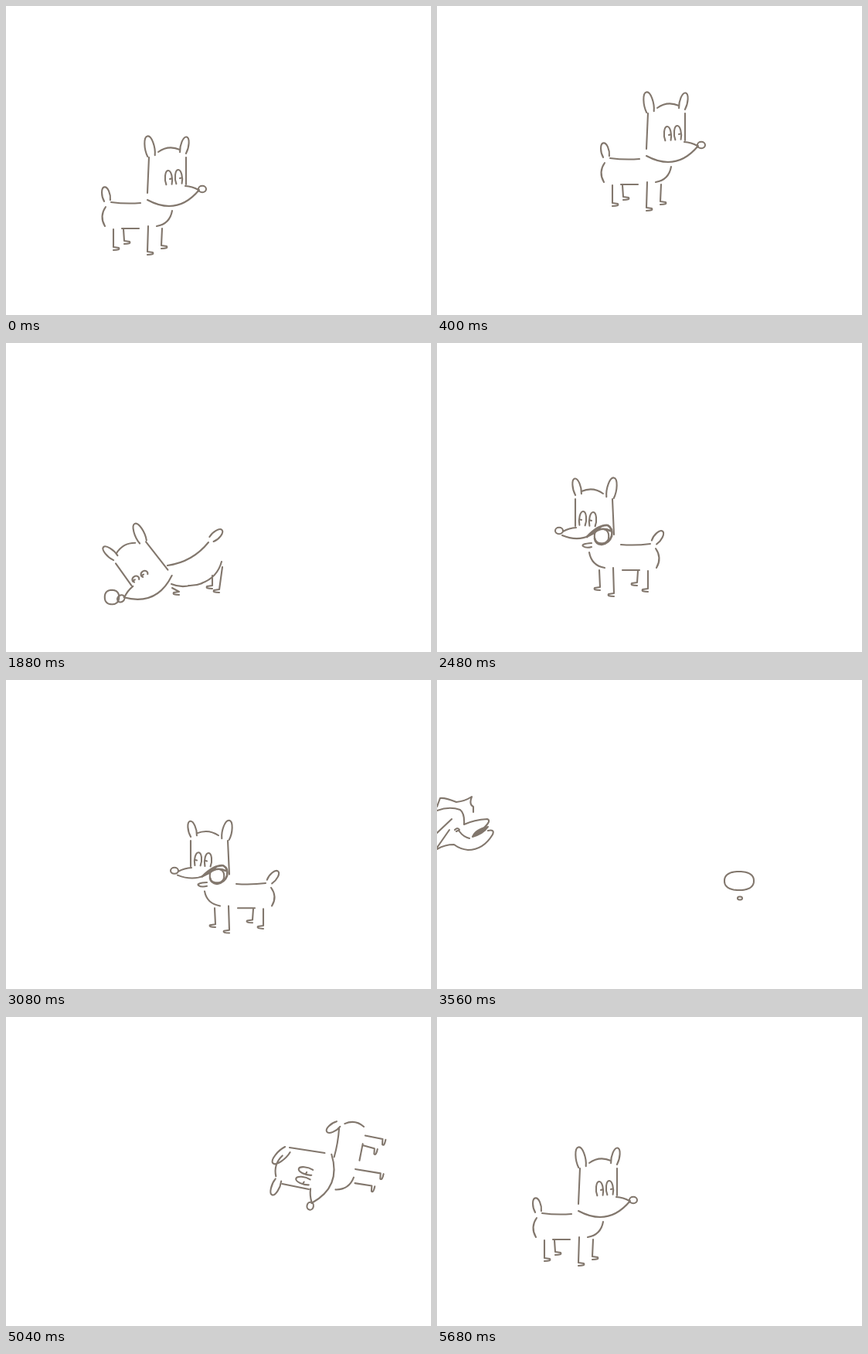
An HTML page with a canvas that plays this animation: 550 px wide and 400 px high, repeating every 6000 ms.

```html
<!DOCTYPE html>
<html lang="en">
<head>
<meta charset="utf-8">
<title>Playful dog</title>
<style>
html, body { margin: 0; width: 100%; height: 100%; overflow: hidden; background: #fff; }
canvas { display: block; }
</style>
</head>
<body>
<canvas id="stage" width="550" height="400"></canvas>
<script>
const ctx = document.getElementById('stage').getContext('2d');
const INK = '#82776d', LINE = 2.1;
const LOOP = 6000, STEP = 80, QUARTER = Math.PI / 2;

const lerp = (a, b, u) => a + (b - a) * u;
const bump = u => 4 * u * (1 - u);
const side = v => v < 0 ? -1 : 1;

// Poses: x, y is the ground under the body, hx, hy the head seen from there.
// body and face are 1 for left, -1 for right.
const stand = {
  x: 162, y: 314, body: -1, face: -1, hx: 47, hy: -100,
  tilt: 0, turn: 0, eye: 1, flop: 0, tail: -1.36, crouch: 0, tall: 1
};
const lookBack = { ...stand, x: 332, face: 1, hx: 41, hy: -97 };
const carry = { ...stand, x: 250, y: 320, body: 1, face: 1, hx: -47, tail: -.92 };
const sniff = { ...carry, hx: -78, hy: -34, tilt: -.62, eye: .35, tail: -.72, crouch: 1 };
const wall = { ...carry, x: 531, y: 182, turn: -QUARTER, flop: -1.3, tail: -2.5 };

const shift = (p, dx, dy = 0) => ({ ...p, x: p.x + dx, y: p.y + dy });
const scale = (p, tall) => ({ ...p, tall });
function mix(p, q, u, arc = 0) {
  const out = {};
  for (const k in p) out[k] = lerp(p[k], q[k], u);
  out.y -= arc * bump(u);
  return out;
}

// Arc from a to b whose middle is pushed h to the side
function bow(ax, ay, bx, by, h = 0) {
  const dx = bx - ax, dy = by - ay, k = 2 * h / Math.hypot(dx, dy);
  ctx.moveTo(ax, ay);
  ctx.quadraticCurveTo((ax + bx) / 2 - dy * k, (ay + by) / 2 + dx * k, bx, by);
}

// Open petal of width w, used for ears, eyes and tail
function petal(x, y, len, angle, w) {
  const c = Math.cos(angle), s = Math.sin(angle);
  const at = (along, out) => [x + c * along * len - s * out * w, y + s * along * len + c * out * w];
  ctx.moveTo(...at(0, -.4));
  ctx.bezierCurveTo(...at(.4, -.65), ...at(1, -.45), ...at(1, 0));
  ctx.bezierCurveTo(...at(1, .45), ...at(.4, .65), ...at(0, .4));
}

function leg(x, y, fx, fy) {
  ctx.moveTo(x, y);
  ctx.lineTo(fx, fy);
  ctx.lineTo(fx - 7, fy + 1);
  ctx.quadraticCurveTo(fx - 9, fy + 4, fx, fy + 4);
}

// Key points of the body for standing and crouching
const PARTS = [
  [bow, [-12, -59, 26, -60, 1], [-41, -32, 12, -62, 6]],
  [bow, [-53, -49, -33, -29, 5], [-36, -8, -12, -6, 2]],
  [bow, [33, -54, 34, -29, -4], [29, -37, 3, -9, -5]],
  [bow, [-10, -26, 12, -26, 0], [-14, -6, 4, -9, 1]],
  [leg, [-40, -26, -39, -4], [-35, -3, -26, 2]],
  [leg, [-22, -29, -21, 4], [-35, -3, -26, 2]],
  [leg, [10, -25, 9, -10], [17, -19, 17, -6]],
  [leg, [23, -25, 23, -2], [30, -30, 26, -1]]
];

function body(p) {
  for (const [part, up, low] of PARTS) part(...up.map((v, i) => lerp(v, low[i], p.crouch)));
  petal(lerp(31, 16, p.crouch), lerp(-62, -66, p.crouch), 18, p.tail, 10);
}

function head(p, full) {
  petal(-20, -24, 21, -1.8 + p.flop, 10);
  petal(21, -20, 26, -1.38 + p.flop, 12);
  bow(-16, -28, 12, -25, -4);
  bow(-24, -18, -24, 17);
  bow(24, -18, 26, 28);
  bow(-23, 19, -40, 24, 1);
  if (full) bow(-41, 29, 9, 18, 9);
  else bow(-41, 24, 26, 37, 14);
  ctx.moveTo(-40, 23);
  ctx.ellipse(-45, 23, 5, 4.2, 0, 0, 7);
  for (const [x, y] of [[-15, 16], [-2, 17]]) {
    petal(x, y, 18 * p.eye, -1.5, 9);
    bow(x - 4, y - 8 * p.eye, x - 1, y - 7 * p.eye);
  }
}

const LIPS = new Path2D('M-19 1Q-4 -15 8 -14Q15 -10 13 0Q10 9 0 11Q-8 10 -9 3M-12 -3Q0 -13 11 -7');
const CHIN = new Path2D('M-13 9Q-27 10 -24 13Q-20 16 -13 14');

function dog(p, full) {
  ctx.save();
  ctx.translate(p.x, p.y);
  ctx.rotate(p.turn);
  ctx.scale(1, p.tall);
  ctx.beginPath();
  ctx.save();
  ctx.scale(side(p.body), 1);
  body(p);
  ctx.restore();
  ctx.translate(p.hx, p.hy);
  ctx.rotate(p.tilt);
  ctx.scale(side(p.face), 1);
  head(p, full);
  ctx.stroke();
  if (full) {
    ctx.translate(10, 30);
    ball(0, 0);
    ctx.stroke(CHIN);
    ctx.lineWidth = 2.7;
    ctx.stroke(LIPS);
  }
  ctx.restore();
}

// Slightly squarish hand-drawn circle
function ball(x, y, rx = 9.2, ry = rx) {
  const soft = v => side(v) * Math.abs(v) ** .85;
  ctx.beginPath();
  for (let a = 0; a < 6.28; a += .1) ctx.lineTo(x + rx * soft(Math.cos(a)), y + ry * soft(Math.sin(a)));
  ctx.closePath();
  ctx.stroke();
}

const RUSH = new Path2D('M0 164L4 153Q10 152 25 158Q36 157 45 151Q41 161 47 164L47 171' +
  'M0 169Q16 163 30 168Q36 173 35 187Q48 181 65 180Q71 182 60 192' +
  'M66 195Q75 193 72 200Q60 220 40 220Q30 219 22 213Q10 213 0 219' +
  'M19 180L0 198M16 194L0 217M23 194Q27 190 29 194L25 196M29 196Q34 203 42 205');
const GAPE = new Path2D('M46 203Q50 193 66 190Q60 199 46 203Z');
function rush(dx) {
  ctx.save();
  ctx.translate(dx, 0);
  ctx.stroke(RUSH);
  ctx.fill(GAPE);
  ctx.stroke(GAPE);
  ctx.restore();
}

// [start in ms, draw(n)] where n counts the steps since the start
const clips = [
  [0, () => dog(stand)],
  [80, n => {
    const u = Math.max(0, (n - 1) / 6);
    dog(n < 2 ? scale(stand, .94 - .08 * n) : shift(stand, 176 * u, -57 * bump(u)));
  }],
  [720, n => dog(n ? lookBack : mix(shift(stand, 176), lookBack, .55))],
  [1040, n => {
    if (!n) return dog(scale(lookBack, .93));
    const u = Math.min(1, n / 7);
    dog(mix(lookBack, shift(carry, 30), u, 45));
    ball(26 + 111 * u, 329 - Math.abs(Math.cos(u * 5 * QUARTER)) * 90 * (1 - u));
  }],
  [1720, n => {
    dog(mix(shift(carry, 30), sniff, Math.min(1, .4 * (n + 1))));
    ball(137, 329);
  }],
  [1880, n => {
    dog(sniff);
    ball(137, 329);
  }],
  [1920, n => {
    const u = Math.min(1, n / 5);
    dog(shift(sniff, -20 * u, 2 * (n % 2)));
    ball(137 - 24 * u, 329);
  }],
  [2400, n => {
    const u = Math.min(1, (n - 1) / 6);
    if (n) return dog(shift(carry, 60 * u, -17 * bump(u)), true);
    dog(mix(shift(sniff, -20), carry, .5));
    ball(113, 329);
  }],
  [3080, n => {
    const from = shift(carry, 60), u = n / 6;
    if (!n) return dog(scale(from, .95), true);
    if (n < 5) dog(mix(from, shift(carry, -320), n / 4, 50));
    else rush((n - 6) * 40);
    ball(273 + 118 * u, 250 + 10 * u - 60 * bump(u), 9 + 10 * u, 9 + 3 * u);
    if (n > 4) ball(392 + (n - 6) * 20, 282.5, 3, 2);
  }],
  [3720, n => {
    const u = Math.min(1, (n + 1) / 6);
    if (u === 1) return dog(scale(wall, .96), true);
    dog(mix(shift(stand, -120, -40), wall, u, 90));
    ball(lerp(450, 461, u), lerp(350, 219, u));
  }],
  [4360, n => {
    if (n < 4) dog(scale(wall, 1 - .04 * Math.sin(n * QUARTER)), true);
    else dog(scale(wall, 1 + .3 * bump(Math.min(1, (n - 3) / 6))));
  }],
  [5040, n => dog(n < 7 ? mix(wall, stand, (n + 1) / 8, 40) : scale(stand, .94))],
  [5680, () => dog(stand)]
];

function draw(t) {
  ctx.fillStyle = '#fff';
  ctx.fillRect(0, 0, 550, 400);
  ctx.strokeStyle = ctx.fillStyle = INK;
  ctx.lineWidth = LINE;
  ctx.lineCap = ctx.lineJoin = 'round';
  const [start, show] = clips.filter(c => c[0] <= t).pop();
  show(Math.floor((t - start) / STEP));
}

const t0 = performance.now();
function tick() {
  draw((performance.now() - t0) % LOOP);
  requestAnimationFrame(tick);
}
tick();
</script>
</body>
</html>
```
